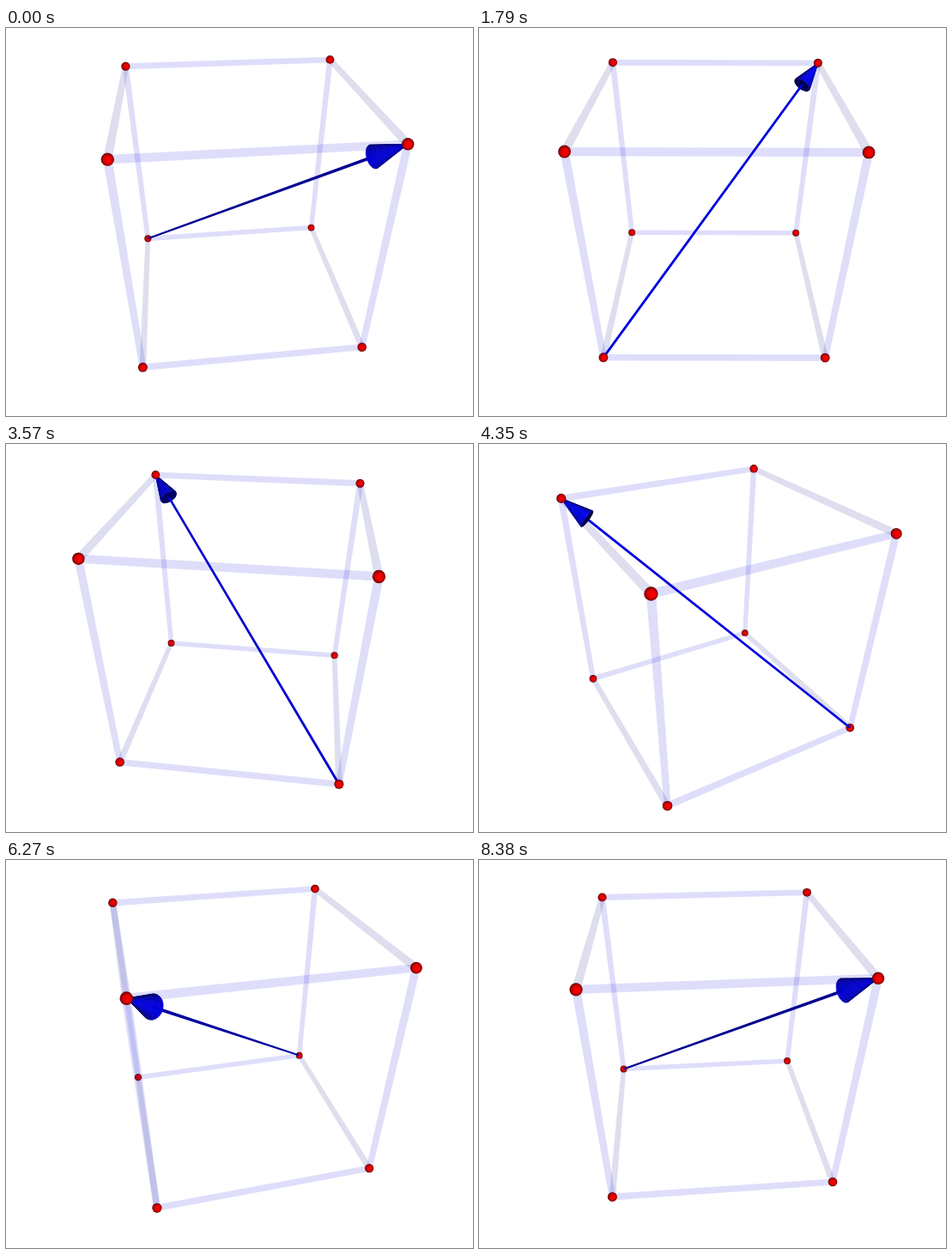
An HTML page with a canvas that plays this animation: 544 by 452 pixels, repeating every 8.48 s.

```html
<!DOCTYPE html>
<html>
<head>
<meta charset="utf-8">
<title>Cube diagonal</title>
<style>
html, body { margin: 0; width: 100%; height: 100%; overflow: hidden; background: #fff; }
canvas { display: block; }
</style>
</head>
<body>
<canvas id="stage" width="544" height="452"></canvas>
<script>
const ctx = document.getElementById('stage').getContext('2d');
const LOOP = 8480;

// Bursts of steps: first time, last time, step count, angle reached (degrees)
const BURSTS = [
  [0, 0, 1, -37.8], [30, 820, 13, 4], [950, 1790, 12, 45.2], [1890, 2710, 12, 85],
  [2770, 2770, 1, 92.1], [2830, 3600, 12, 131], [3630, 4350, 10, 163.9],
  [4450, 4450, 1, 168], [4510, 4710, 3, 176], [4870, 5700, 12, 217.2],
  [5760, 6270, 7, 239], [6400, 6560, 3, 248.5], [6690, 7160, 9, 282.9],
  [7260, 7490, 3, 292], [7620, 8030, 6, 311], [8190, 8380, 3, 320.4]
];

function angleAt(t) {
  let i = BURSTS.length - 1;
  while (t < BURSTS[i][0]) i--;
  const [start, end, count, angle] = BURSTS[i];
  const from = i ? BURSTS[i - 1][3] : angle;
  const gap = (end - start) / (count - 1) || 1;
  const step = Math.min(count, 1 + Math.floor((t - start) / gap + 1e-6));
  return (from + (angle - from) * step / count) * Math.PI / 180;
}

// World axes: x right, y away from the viewer, z up
const FOCAL = 580.8, DISTANCE = 4.6793, SIN = 0.6105, COS = 0.7921;
const LIGHT = [0.22, -0.88, 0.44], FILL = [-0.88, 0.44, -0.22];
const BALL = 0.042, TUBE = 0.029, SHAFT = 0.011, HEAD = 0.088, HEAD_PART = 0.16;

const dot = (a, b) => a[0] * b[0] + a[1] * b[1] + a[2] * b[2];
const mix = (a, b, k) => a.map((v, i) => v + (b[i] - v) * k);
const scale = (a, k) => a.map(v => v * k);
const unit = a => scale(a, 1 / Math.hypot(...a));
const cross = (a, b) => [
  a[1] * b[2] - a[2] * b[1], a[2] * b[0] - a[0] * b[2], a[0] * b[1] - a[1] * b[0]
];
const depth = p => DISTANCE + p[1] * COS - p[2] * SIN;

function project([x, y, z]) {
  const k = FOCAL / depth([x, y, z]);
  return { x: 274.8 + (x + 0.0088 * z) * k,
           y: 273.1 - (0.544 + y * SIN + z * COS - 0.004 * x) * k, k };
}

const blue = (level, alpha = 1) =>
  `rgba(0,0,${Math.round(255 * Math.min(1, level))},${alpha})`;
const lit = n => 0.2 + 0.8 * Math.max(0, dot(n, LIGHT)) + 0.3 * Math.max(0, dot(n, FILL));

function polygon(points, color, seal) {
  ctx.beginPath();
  points.forEach(p => ctx.lineTo(p.x, p.y));
  ctx.closePath();
  ctx.fillStyle = ctx.strokeStyle = color;
  ctx.fill();
  if (seal) { ctx.lineWidth = 0.6; ctx.stroke(); }
}

function tube(a, b, radius, alpha) {
  const along = dot(unit(mix(a, b, 1).map((v, i) => v - a[i])), LIGHT);
  const level = 0.2 + 0.68 * Math.sqrt(Math.max(0, 1 - along * along));
  const p = project(a), q = project(b);
  const length = Math.hypot(q.x - p.x, q.y - p.y) || 1;
  const nx = (p.y - q.y) / length * radius, ny = (q.x - p.x) / length * radius;
  const side = (s, sign) => ({ x: s.x + sign * nx * s.k, y: s.y + sign * ny * s.k });
  polygon([side(p, 1), side(q, 1), side(q, -1), side(p, -1)], blue(level, alpha));
}

function ball(center) {
  const { x, y, k } = project(center), r = BALL * k;
  const shade = ctx.createRadialGradient(x + 0.2 * r, y + 0.15 * r, 0, x, y, r);
  [[0, 255], [0.55, 225], [0.82, 165], [1, 75]].forEach(
    ([at, red]) => shade.addColorStop(at, `rgb(${red},0,0)`));
  ctx.fillStyle = shade;
  ctx.beginPath();
  ctx.arc(x, y, r, 0, 7);
  ctx.fill();
}

function cone(base, tip) {
  const N = 36, axis = unit(tip);
  const u = unit(cross(axis, [0, 0, 1])), v = cross(axis, u);
  const height = Math.hypot(...tip.map((c, i) => c - base[i]));
  const around = i => {
    const a = i * 2 * Math.PI / N;
    return u.map((c, j) => c * Math.cos(a) + v[j] * Math.sin(a));
  };
  const rim = [];
  for (let i = 0; i <= N; i++) rim.push(project(base.map((c, j) => c + HEAD * around(i)[j])));
  const top = project(tip);
  const turn = (a, b, c) => (b.x - a.x) * (c.y - a.y) - (b.y - a.y) * (c.x - a.x);
  const facing = [];
  for (let i = 0; i < N; i++) if (turn(rim[i], rim[i + 1], top) < 0) facing.push(i);
  if (turn(rim[0], rim[N / 3], rim[2 * N / 3]) > 0)
    polygon(rim, blue(0.75 * lit(scale(axis, -1))));
  facing.forEach(i => {
    const n = unit(around(i + 0.5).map((c, j) => c * height + axis[j] * HEAD));
    polygon([rim[i], rim[i + 1], top], blue(lit(n)), true);
  });
}

function draw(t) {
  const angle = angleAt(t);
  const corner = (i, z) => {
    const a = angle + i * Math.PI / 2;
    return [Math.SQRT2 * Math.cos(a), Math.SQRT2 * Math.sin(a), z];
  };
  const items = [];
  const add = (d, paint) => items.push({ d, paint });
  const edge = (a, b) => add(depth(mix(a, b, 0.5)),
    () => tube(mix(a, b, 0.02), mix(a, b, 0.98), TUBE, 0.13));

  for (let i = 0; i < 4; i++) {
    edge(corner(i, 1), corner(i, -1));
    for (const z of [-1, 1]) {
      edge(corner(i, z), corner(i + 1, z));
      add(depth(corner(i, z)), () => ball(corner(i, z)));
    }
  }

  const tip = corner(0, 1), tail = scale(tip, -1), neck = scale(tip, 1 - HEAD_PART);
  add(depth([0, 0, 0]), () => tube(tail, neck, SHAFT, 1));
  add(Math.max(depth(neck), depth(tip) + 0.001), () => cone(neck, tip));

  ctx.fillStyle = '#fff';
  ctx.fillRect(0, 0, 544, 452);
  items.sort((a, b) => b.d - a.d).forEach(item => item.paint());
}

const begin = performance.now();
function tick() {
  draw((performance.now() - begin) % LOOP);
  requestAnimationFrame(tick);
}
tick();
</script>
</body>
</html>
```
